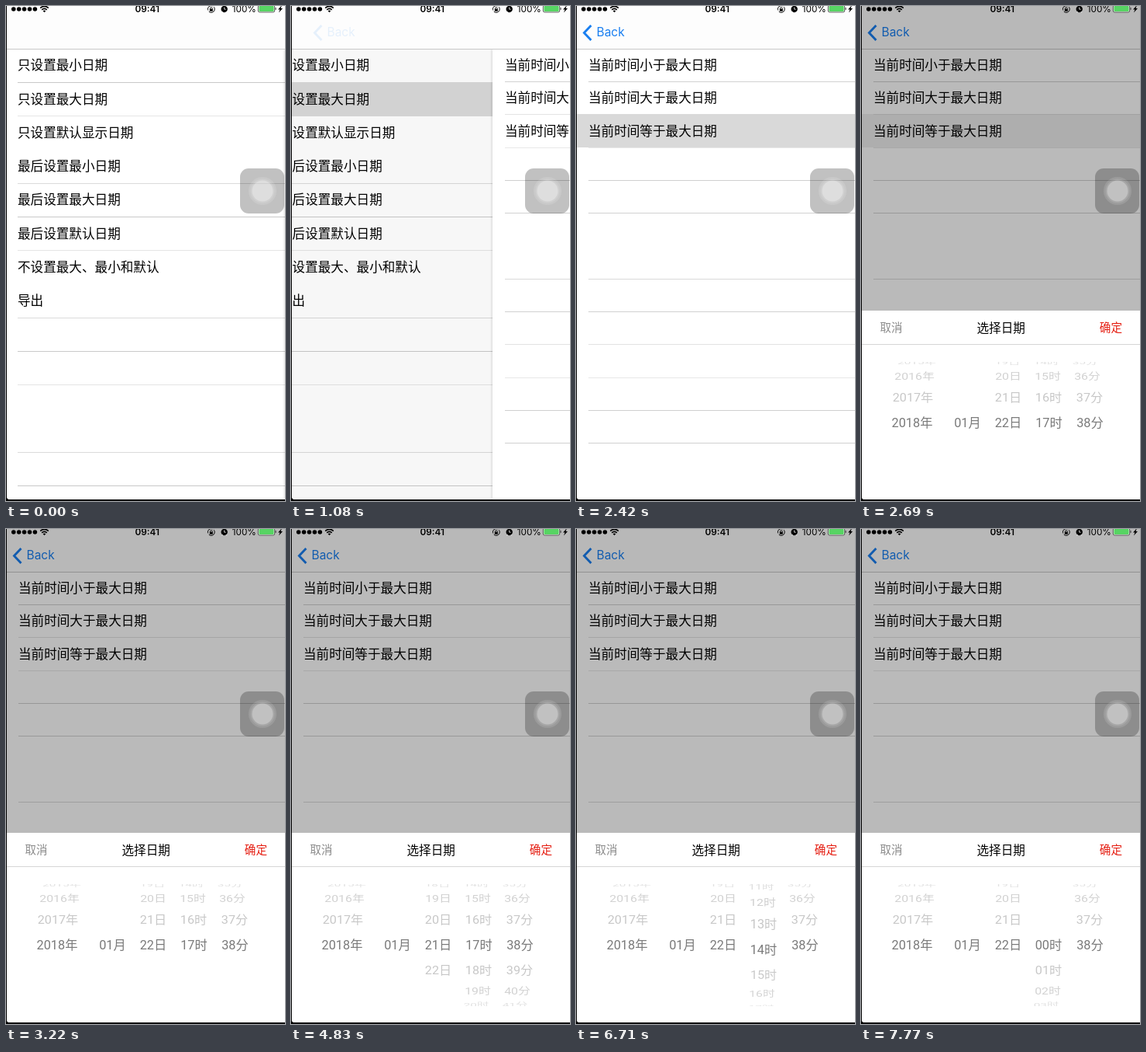
An HTML page for the animation above (8000 ms loop, 360 by 637 pixels).

```html
<!DOCTYPE html>
<html lang="zh-CN">
<head>
<meta charset="utf-8">
<title>日期选择</title>
<style>
@property --day { syntax: "<number>"; inherits: true; initial-value: 22; }
@property --hour { syntax: "<number>"; inherits: true; initial-value: 17; }

html, body { margin: 0; width: 100%; height: 100%; overflow: hidden; background: #000; }
body { font: 350 16.6px "Noto Sans CJK SC", "Noto Sans CJK", sans-serif; color: #000; }
div, span, i, b, svg { position: absolute; }
span { white-space: nowrap; line-height: 24px; }

/* Every animation shares one 8 s clock and jumps between poses. */
.screen, .page, .shade, .hit, .back, .dim, .panel, .day, .hour, .extra {
  animation: 8s step-end infinite;
}

.screen { inset: 0 0 2px; overflow: hidden; background: #fff; clip-path: inset(0 0 0 1px round 0 0 0 4px); }
.page { top: 56px; left: 0; width: 360px; height: 579px; background: #fff; }
.page i { right: 0; height: 1px; background: #000; }
.page span { transform: translateY(-12px); }
.hit { left: 0; width: 100%; background: #d9d9d9; opacity: 0; }
.shade { inset: 0; background: #000; opacity: 0; }
#first { animation-name: slide-out; }
#first .hit { top: 42px; height: 44px; animation-name: tap-first; }
#first .shade { animation-name: shade; }
#second { transform: translateX(360px); animation-name: slide-in; box-shadow: -1px 0 3px #0002; }
#second .hit { top: 83px; height: 43px; animation-name: tap-second; }

.nav { top: 0; left: 0; width: 100%; height: 55px; background: #fdfdfd; border-bottom: 1px solid #c8c8c8; }
.back { left: 0; top: 0; color: #1a7ff0; opacity: 0; animation-name: back; }
.back span { left: 26.5px; top: 22px; font: 15.5px/24px Inter, sans-serif; }

.touch { left: 302px; top: 209px; width: 57px; height: 58px; border-radius: 11px; background: rgba(0, 0, 0, .245); }
.touch b { left: 50%; top: 50%; border-radius: 50%; transform: translate(-50%, -50%); background: rgba(255, 255, 255, .12); }
.dim { inset: 0; background: rgba(0, 0, 0, .27); visibility: hidden; animation-name: show; }
.status { left: 0; top: 0; font-family: Inter, Roboto, sans-serif; font-weight: 400; }

.panel { left: 0; top: 391px; width: 360px; height: 246px; background: #fff; visibility: hidden; animation-name: panel; }
.panel > span { top: 9px; }
.panel > i { top: 43px; left: 0; width: 100%; height: 1px; background: #d6d6d6; }

.wheel { left: 0; width: 100%; overflow: hidden; background: #fff; font: 16.3px Roboto, "Noto Sans CJK SC", "Noto Sans CJK", sans-serif; }
.rim { top: 66px; height: 157px; --mid: 78.5px; color: #c4c4c4; }
.lens { top: 128px; height: 32px; --mid: 16.5px; color: #7a7a7a; }
.col { left: 0; top: 0; width: 0; }
.day { animation-name: day; }
.hour { animation-name: hour; }
.extra { visibility: hidden; animation-name: extra; }
/* Labels sit on a drum: 20 degrees a row, radius 95, eye distance 800; they fade as they turn away. */
.col span {
  --k: calc(var(--i) - var(--at));
  --cos: cos(var(--k) * 20deg);
  --s: calc(800 / (895 - 95 * var(--cos)));
  left: calc(180px + (var(--x) - 180) * var(--s) * 1px);
  top: calc(var(--mid) + 95px * var(--s) * sin(var(--k) * 20deg));
  opacity: calc(var(--cos) * clamp(0, (3.9 - max(var(--k), -1 * var(--k))) * 1000, 1));
  transform: translate(-50%, -50%) scale(var(--s), calc(var(--s) * var(--cos)));
}

@keyframes slide-out {
  0% { transform: none; }
  13.5% { transform: translateX(-30px); }
  16.875%, 100% { transform: translateX(-105.5px); }
}
@keyframes shade {
  0% { opacity: 0; }
  13.5% { opacity: .03; }
  16.875%, 100% { opacity: .1; }
}
@keyframes slide-in {
  0% { transform: translateX(360px); }
  13.5% { transform: translateX(260px); }
  16.875% { transform: translateX(8px); }
  20.25%, 100% { transform: none; }
}
@keyframes tap-first {
  0% { opacity: 0; }
  13.5%, 100% { opacity: 1; }
}
@keyframes tap-second {
  0% { opacity: 0; }
  30.25% { opacity: 1; }
  33.625% { opacity: .42; }
  37%, 100% { opacity: 0; }
}
@keyframes back {
  0% { opacity: 0; }
  13.5% { opacity: .1; transform: translateX(20px); }
  16.875% { opacity: .65; transform: translateX(.7px); }
  20.25%, 100% { opacity: 1; transform: none; }
}
@keyframes show {
  0% { visibility: hidden; }
  33.625%, 100% { visibility: visible; }
}
@keyframes panel {
  0% { visibility: hidden; transform: translateY(246px); }
  33.625% { visibility: visible; transform: translateY(1px); }
  37%, 100% { visibility: visible; transform: none; }
}
@keyframes day {
  0% { --day: 22; }
  53.75% { --day: 21.25; }
  57% { --day: 21.03; }
  60.375% { --day: 21; }
  67% { --day: 21.12; }
  70.375% { --day: 21.8; }
  73.75% { --day: 21.97; }
  80.5%, 100% { --day: 22; }
}
@keyframes hour {
  0% { --hour: 17; }
  83.875% { --hour: 13.8; }
  87.125% { --hour: 2.1; }
  90.5% { --hour: .6; }
  93.875% { --hour: -.2; }
  97.125%, 100% { --hour: -.02; }
}
@keyframes extra {
  0% { visibility: hidden; }
  60.375% { visibility: inherit; }
  73.75%, 100% { visibility: hidden; }
}
</style>
</head>
<body>
<div class="screen">
  <div class="page" id="first"></div>
  <div class="page" id="second"></div>
  <div class="nav">
    <div class="back">
      <svg width="24" height="50" fill="none" stroke="currentColor" stroke-width="2.9"><path d="M19.5 25 10.5 34.5 19.5 44"/></svg>
      <span>Back</span>
    </div>
  </div>
  <div class="dim"></div>
  <div class="touch">
    <b style="width:36px;height:36px"></b>
    <b style="width:31px;height:31px"></b>
    <b style="width:27px;height:27px;background:rgba(255,255,255,.29)"></b>
  </div>
  <svg class="status" width="360" height="12">
    <path d="M9.8 4H38" stroke="#000" stroke-width="5.6" stroke-linecap="round" stroke-dasharray="0 6.9"/>
    <g fill="none" stroke="#000" stroke-width="1.6">
      <path d="M44.2 2.6Q49.5-2 54.8 2.6M46.2 4.8Q49.5 2 52.8 4.8"/>
      <circle cx="264.8" cy="4" r="4.4" stroke-width="1" stroke-dasharray="10 2"/>
      <path d="M263.5 4V3a1.3 1.3 0 0 1 2.6 0V4" stroke-width=".8"/>
    </g>
    <path d="M47.6 6.2Q49.5 4.8 51.4 6.2L49.5 8.3ZM262.8 3.7h4v3h-4ZM356 -1 351 4.5h2.4L352 8.5 357 3h-2.5Z"/>
    <circle cx="281.7" cy="4" r="4.2"/>
    <path d="M281.7 1.5V4.2H283.6M278.6 8.4l1-1.4M284.8 8.4l-1-1.4" fill="none" stroke="#fff" stroke-width=".8"/>
    <text x="182.3" y="8.2" font-size="11.8" font-weight="600" text-anchor="middle">09:41</text>
    <text x="307.3" y="8.2" font-size="11.8" text-anchor="middle">100%</text>
    <rect x="325.3" y="-1" width="21.4" height="9" rx="2" fill="#fff" stroke="#333" stroke-width=".8"/>
    <rect x="326.4" y="0" width="19.2" height="7" rx="1" fill="#57d463"/>
    <path d="M348 2v3" stroke="#333"/>
  </svg>
  <div class="panel">
    <span style="left:24.5px;font-size:14.5px;color:#8a8a8a">取消</span>
    <span style="left:149.5px;font-size:15.6px">选择日期</span>
    <span style="left:307.8px;font-size:14.6px;color:#e51c10">确定</span>
    <i></i>
    <div class="wheel rim"></div>
    <div class="wheel lens"></div>
  </div>
</div>
<script>
const add = (parent, tag, css, text = '', cls = '') => {
  const el = document.createElement(tag);
  el.style.cssText = css;
  el.textContent = text;
  el.className = cls;
  parent.append(el);
};

// shades: how dark each hairline is, repeating down the list
function fillList(id, { left, line, text, pitch, shades, rows }) {
  const page = document.getElementById(id);
  for (let k = 0; k < 13; k++) {
    const y = Math.round(line + pitch * k) - 56;
    add(page, 'i', `left:${left}px;top:${y}px;opacity:${shades[k % shades.length]}`);
  }
  add(page, 'div', '', '', 'hit');
  rows.forEach((row, k) => add(page, 'span', `left:${left}px;top:${text + pitch * k - 56}px`, row));
  add(page, 'div', '', '', 'shade');
}

fillList('first', {
  left: 15, line: 98, text: 75.4, pitch: 43.25, shades: [.21, .1, 0, .14],
  rows: ['只设置最小日期', '只设置最大日期', '只设置默认显示日期', '最后设置最小日期',
    '最后设置最大日期', '最后设置默认日期', '不设置最大、最小和默认', '导出'],
});
fillList('second', {
  left: 16, line: 97, text: 75.1, pitch: 42.3, shades: [.18, .11, .09, .19, .18, 0, .15],
  rows: ['小于', '大于', '等于'].map(word => `当前时间${word}最大日期`),
});

const columns = [
  { x: 66, unit: '年', from: 2014, to: 2018, at: 2018 },
  { x: 137.5, unit: '月', from: 1, to: 1, at: 1 },
  { x: 190, unit: '日', from: 16, to: 22, at: 'var(--day)', cls: 'day' },
  { x: 242.5, unit: '时', from: 0, to: 17, more: 4, at: 'var(--hour)', cls: 'hour' },
  { x: 295.5, unit: '分', from: 34, to: 38, more: 4, at: 38 },
];
for (const wheel of document.querySelectorAll('.wheel')) {
  for (const { x, unit, from, to, more = 0, at, cls = '' } of columns) {
    add(wheel, 'div', `--x:${x};--at:${at}`, '', `col ${cls}`);
    for (let i = from; i <= to + more; i++) {
      add(wheel.lastChild, 'span', `--i:${i}`, String(i).padStart(2, '0') + unit, i > to ? 'extra' : '');
    }
  }
}
</script>
</body>
</html>
```
